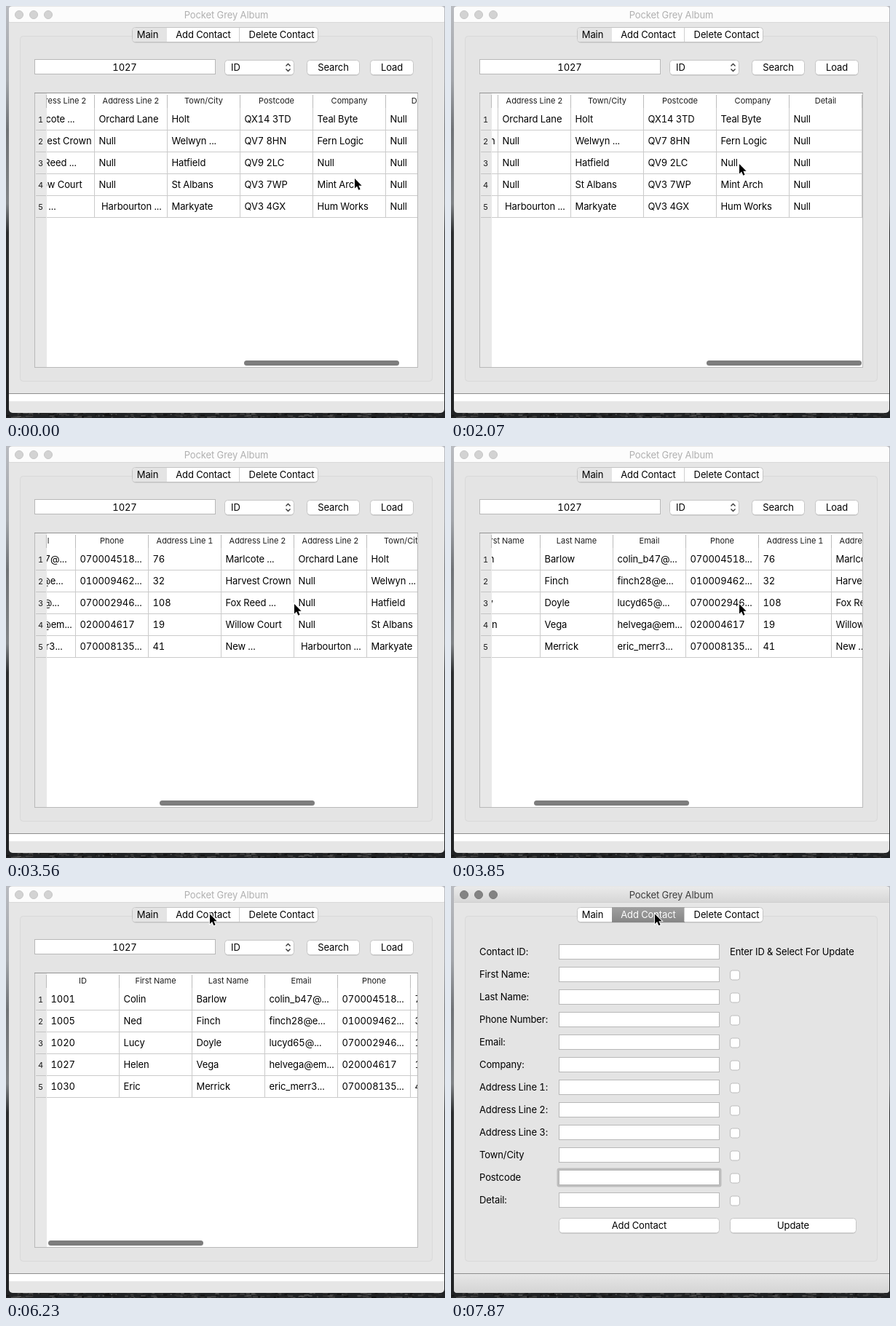
These frames come from a looping animation (603 px wide and 566 px high, 8000 ms). An HTML page:

```html
<!DOCTYPE html>
<html lang="en">
<head>
<meta charset="utf-8">
<title>Contact book</title>
<style>
  html, body { margin: 0; width: 100%; height: 100%; overflow: hidden; background: #333; }
  svg { display: block; width: 603px; height: 566px; }
  text {
    font: 13px Inter, Roboto, sans-serif;
    font-variant-numeric: tabular-nums;
    letter-spacing: -0.1px;
    fill: #000;
    white-space: pre;
  }
  text.small { font-size: 11px; letter-spacing: 0; fill: #1c1c1c; }
</style>
</head>
<body>
<svg id="stage" viewBox="0 0 603 566" xmlns="http://www.w3.org/2000/svg">
  <defs>
    <linearGradient id="sky" x2="0" y2="1">
      <stop offset="0" stop-color="#b9bbc0"/>
      <stop offset=".18" stop-color="#a2a5aa"/>
      <stop offset=".3" stop-color="#707377"/>
      <stop offset=".48" stop-color="#808386"/>
      <stop offset=".55" stop-color="#2c2e30"/>
      <stop offset="1" stop-color="#202224"/>
    </linearGradient>
    <linearGradient id="bar" x2="0" y2="1">
      <stop offset="0" stop-color="#eaeaea"/>
      <stop offset="1" stop-color="#d6d6d6"/>
    </linearGradient>
    <linearGradient id="foot" x2="0" y2="1">
      <stop offset="0" stop-color="#e6e6e6"/>
      <stop offset="1" stop-color="#d4d4d4"/>
    </linearGradient>
    <linearGradient id="tab" x2="0" y2="1">
      <stop offset="0" stop-color="#a0a0a0"/>
      <stop offset="1" stop-color="#858585"/>
    </linearGradient>
    <clipPath id="view"><rect x="56" y="120" width="509" height="375"/></clipPath>
  </defs>
</svg>
<script>
const LOOP = 8000, ACTIVATE = 7270, SWITCH = 7420, CARET_OFF = 7870;
const COL = 100, ROW = 30, MAX_SCROLL = 691;

const headers = ['ID', 'First Name', 'Last Name', 'Email', 'Phone', 'Address Line 1',
  'Address Line 2', 'Address Line 2', 'Town/City', 'Postcode', 'Company', 'Detail'];
const rows = [
  ['1001', 'Colin', 'Barlow', 'colin_b47@...', '070004518...', '76', 'Marlcote ...',
    'Orchard Lane', 'Holt', 'QX14 3TD', 'Teal Byte', 'Null'],
  ['1005', 'Ned', 'Finch', 'finch28@e...', '010009462...', '32', 'Harvest Crown',
    'Null', 'Welwyn ...', 'QV7 8HN', 'Fern Logic', 'Null'],
  ['1020', 'Lucy', 'Doyle', 'lucyd65@...', '070002946...', '108', 'Fox Reed ...',
    'Null', 'Hatfield', 'QV9 2LC', 'Null', 'Null'],
  ['1027', 'Helen', 'Vega', 'helvega@em...', '020004617', '19', 'Willow Court',
    'Null', 'St Albans', 'QV3 7WP', 'Mint Arch', 'Null'],
  ['1030', 'Eric', 'Merrick', 'eric_merr3...', '070008135...', '41', 'New ...',
    ' Harbourton ...', 'Markyate', 'QV3 4GX', 'Hum Works', 'Null']
];
const fields = ['Contact ID:', 'First Name:', 'Last Name:', 'Phone Number:', 'Email:', 'Company:',
  'Address Line 1:', 'Address Line 2:', 'Address Line 3:', 'Town/City', 'Postcode', 'Detail:'];

// [time, scroll offset]
const scrollSteps = [[0, 634], [140, 691], [3120, 687], [3270, 640], [3420, 520], [3560, 360],
  [3710, 225], [3850, 133], [4000, 45], [4150, 0]];
// [time, x, y] of the pointer tip
const pointerSteps = [[0, 479, 237], [890, 431, 240.5], [1040, 416, 236], [1190, 403, 230],
  [1340, 393, 224], [1480, 387, 219], [1630, 386, 217], [1780, 390, 217], [1920, 395.3, 217],
  [2070, 396, 217], [5050, 365.5, 179], [5200, 340, 135], [5350, 318, 95], [5500, 301, 60],
  [5640, 291, 38], [5790, 286, 29], [6080, 282, 33], [6230, 280, 38.5]];

const stage = document.getElementById('stage');

function add(parent, tag, attrs = {}) {
  const el = document.createElementNS('http://www.w3.org/2000/svg', tag);
  for (const key in attrs) el.setAttribute(key, attrs[key]);
  return parent.appendChild(el);
}
const group = (parent, attrs) => add(parent, 'g', attrs);
const rect = (p, x, y, width, height, fill, more) =>
  add(p, 'rect', { x, y, width, height, fill, ...more });
// Bordered box whose one pixel stroke lies inside its bounds
const box = (p, x, y, w, h, fill, stroke, rx = 0) =>
  rect(p, x + .5, y + .5, w - 1, h - 1, fill, { stroke, rx });
function label(p, x, y, str, anchor = 'start', cls = '') {
  const el = add(p, 'text', { x, y, 'text-anchor': anchor, class: cls });
  el.textContent = str;
  return el;
}
function button(p, x, y, w, str) {
  rect(p, x + 1, y + 1.5, w - 2, 20, '#bdbdbd', { rx: 4 });
  box(p, x, y, w, 21, '#fff', '#c6c6c6', 4);
  if (str) label(p, x + w / 2, y + 15, str, 'middle');
}
const show = (el, on) => el.setAttribute('display', on ? 'inline' : 'none');

function drawDesktop() {
  rect(stage, 0, 0, 603, 566, 'url(#sky)');
  let seed = 7;
  const rnd = () => (seed = seed * 16807 % 2147483647) / 2147483647;
  for (let i = 0; i < 260; i++) {
    const v = 15 + rnd() * 65 | 0;
    rect(stage, rnd() * 603, 557 + rnd() * 8, 2 + rnd() * 6, 2, `rgb(${v},${v},${v})`);
  }
}

function drawWindow() {
  const g = group(stage);
  rect(g, 4, 0, 598, 559, '#e6e6e6', { rx: 5 });
  rect(g, 4, 1, 598, 22, '#fcfcfc', { rx: 3 });
  rect(g, 4, 22, 598, 1, '#dadada');
  const activeBar = group(g);
  rect(activeBar, 4, 1, 598, 22, 'url(#bar)', { rx: 3 });
  rect(activeBar, 4, 22, 598, 1, '#cfcfcf');
  const lights = [18, 38, 58].map(cx =>
    add(g, 'circle', { cx, cy: 12, r: 5.5 }));
  const title = label(g, 302.5, 17, 'Pocket Grey Album', 'middle');

  box(g, 19, 41, 567, 475, '#e4e4e4', '#d9d9d9', 4);
  rect(g, 4, 532, 598, 1, '#8e8e8e');
  const strip = rect(g, 4, 533, 598, 10, '#fff');
  const foot = rect(g, 4, 533, 598, 26, 'url(#foot)', { rx: 4 });
  return { activeBar, lights, title, strip, foot };
}

function drawTabs() {
  const g = group(stage);
  rect(g, 174, 30.5, 254, 20, '#bbb', { rx: 4 });
  box(g, 173, 29, 256, 21, '#fff', '#c4c4c4', 4);
  const main = add(g, 'path', {
    d: 'M221 30H177.5a3.5 3.5 0 0 0-3.5 3.5V45.5a3.5 3.5 0 0 0 3.5 3.5H221z', fill: '#e4e4e4'
  });
  const contact = rect(g, 221, 29, 100, 21, 'url(#tab)');
  rect(g, 320, 30, 1, 19, '#cfcfcf');
  label(g, 194.5, 44, 'Main', 'middle');
  const text = label(g, 271, 44, 'Add Contact', 'middle');
  label(g, 378.5, 44, 'Delete Contact', 'middle');
  return { main, contact, text };
}

function drawMainPage() {
  const g = group(stage);
  box(g, 39, 73, 249, 21, '#fff', '#b8b8b8');
  label(g, 163, 89, '1027', 'middle');
  button(g, 300, 74, 96);
  label(g, 309, 88.5, 'ID');
  add(g, 'path', {
    d: 'M384.5 82.5l3-3 3 3M384.5 86.5l3 3 3-3', fill: 'none', stroke: '#333', 'stroke-width': 1.3
  });
  button(g, 413, 74, 73, 'Search');
  button(g, 500, 74, 60, 'Load');

  box(g, 39, 119, 527, 378, '#fff', '#b9b9b9');
  rect(g, 39, 119, 527, 1, '#949494');
  rect(g, 40, 120, 16, 376, '#e8e8e8');
  rect(g, 55, 122, 1, 18, '#bcbcbc');
  rows.forEach((_, r) => {
    const y = 140 + ROW * r;
    label(g, 47.5, y + 19.5, r + 1, 'middle', 'small');
    rect(g, 41, y + ROW, 14, 1, '#c4c4c4');
  });

  const view = group(g, { 'clip-path': 'url(#view)' });
  const table = group(view);
  headers.forEach((name, c) => {
    const x = 55 + COL * c;
    label(table, x + 50.5, 134, name, 'middle', 'small');
    rect(table, x + COL, 122, 1, 18, '#bcbcbc');
    rect(table, x + COL, 140, 1, ROW * rows.length + 1, '#cbcbcb');
    rows.forEach((cells, r) => label(table, x + 6.5, 160 + ROW * r, cells[c]));
  });
  rows.forEach((_, r) => rect(table, 56, 170 + ROW * r, COL * headers.length, 1, '#cbcbcb'));
  const thumb = rect(g, 58, 487, 213, 7, '#7d7d7d', { rx: 3.5 });
  return { g, table, thumb };
}

function drawContactPage() {
  const g = group(stage);
  fields.forEach((name, i) => {
    const y = 80 + 31 * i;
    label(g, 39, y + 15, name);
    if (name === 'Postcode') rect(g, 145.5, y - 2.5, 226, 26, '#bdbdbd', { rx: 3 });
    box(g, 148, y, 221, 21, '#fff', '#b8b8b8');
    if (i) box(g, 383, y + 4.5, 14, 14, '#fff', '#bcbcbc', 3);
  });
  label(g, 383, 95, 'Enter ID & Select For Update');
  button(g, 148, 456, 221, 'Add Contact');
  button(g, 383, 456, 174, 'Update');
  const caret = rect(g, 150, 393, 1, 15, '#000');
  return { g, caret };
}

drawDesktop();
const win = drawWindow();
const tabs = drawTabs();
const mainPage = drawMainPage();
const contactPage = drawContactPage();
const pointer = add(stage, 'path', {
  d: 'M0 0V13.5L3.1 10.6L5.4 15.7L7.6 14.7L5.4 9.7H9.6z',
  fill: '#000', stroke: '#fff', 'stroke-width': 1.8, 'paint-order': 'stroke'
});

const at = (steps, t) => steps.findLast(s => s[0] <= t);

function draw(now) {
  const t = Math.max(0, now) % LOOP;
  const active = t >= ACTIVATE, adding = t >= SWITCH;

  show(win.activeBar, active);
  win.title.style.fill = active ? '#3c3c3c' : '#b0b0b0';
  for (const dot of win.lights) {
    dot.setAttribute('fill', active ? '#838383' : '#d3d3d3');
    dot.setAttribute('stroke', active ? '#777' : '#c6c6c6');
  }
  show(win.strip, !adding);
  show(win.foot, adding);

  show(tabs.main, !adding);
  show(tabs.contact, adding);
  tabs.text.style.fill = adding ? '#fff' : '#000';

  show(mainPage.g, !adding);
  show(contactPage.g, adding);
  show(contactPage.caret, t < CARET_OFF);

  const scroll = at(scrollSteps, t)[1];
  mainPage.table.setAttribute('transform', `translate(${-scroll} 0)`);
  mainPage.thumb.setAttribute('x', Math.round(58 + 293 * scroll / MAX_SCROLL));

  const [, x, y] = at(pointerSteps, t);
  pointer.setAttribute('transform', `translate(${x} ${y})`);
}

function tick() {
  draw(performance.now());
  requestAnimationFrame(tick);
}
tick();
</script>
</body>
</html>
```
